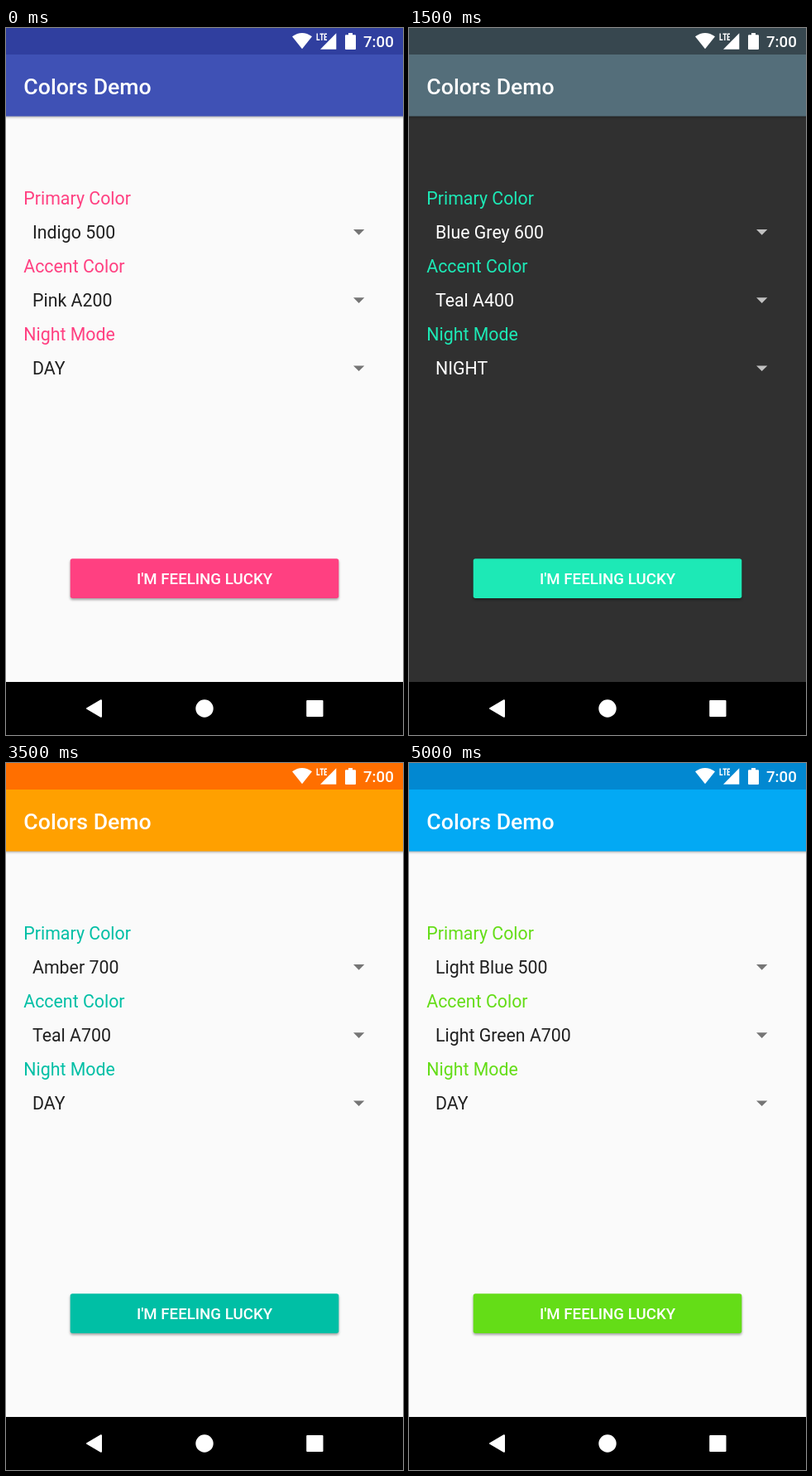
These frames come from a looping animation (480 px wide and 853 px high, 5500 ms). An HTML page:

```html
<!DOCTYPE html>
<html lang="en">
<head>
<meta charset="utf-8">
<title>Colors Demo</title>
<style>
  html, body { margin: 0; width: 100%; height: 100%; overflow: hidden; }
  svg { display: block; width: 100%; height: 100%; background: var(--page); }
  text { font: 21.33px Roboto, sans-serif; }
  .status { fill: var(--dark); }
  .bar { fill: var(--primary); filter: drop-shadow(0 1.5px 1.5px rgba(0, 0, 0, .35)); }
  .accent { fill: var(--accent); }
  .button { filter: drop-shadow(0 2px 1.5px rgba(0, 0, 0, .35)); }
  .value { fill: var(--ink); }
  .arrow { fill: var(--arrow); }
  .title { font-size: 26.67px; font-weight: 500; }
  .small { font-size: 18.67px; font-weight: 500; }
</style>
</head>
<body>
<svg viewBox="0 0 480 853">
  <rect class="bar" x="-10" y="20" width="500" height="86.5"/>
  <rect class="status" width="480" height="32"/>

  <g fill="#fff">
    <path d="M346 10.3Q358 1.700 370 10.300L358 25.300Z"/>
    <path d="M380 25.700H399.300V6.300Z"/>
    <path d="M376.200 6.500V14.300H379.400M379.500 7.200H384M381.800 7V15M388 7.200H385.300V14.300H388M385.300 10.700H387.700" fill="none" stroke="#fff" stroke-width="1.4"/>
    <path d="M414 6H419V8.200H422Q423 8.200 423 9.200V25Q423 26 422 26H411Q410 26 410 25V9.200Q410 8.200 411 8.200H414Z"/>
    <text class="small" x="432" y="23">7:00</text>
    <text class="title" x="21.3" y="79.5">Colors Demo</text>
  </g>

  <g class="accent">
    <text x="21.3" y="213">Primary Color</text>
    <text x="21.3" y="295">Accent Color</text>
    <text x="21.3" y="377.300">Night Mode</text>
    <rect class="button" x="77.700" y="640.300" width="324.600" height="47.700" rx="2.700"/>
  </g>
  <g class="value">
    <text x="32" y="254"></text>
    <text x="32" y="336"></text>
    <text x="32" y="418.300"></text>
  </g>
  <path class="arrow" d="M420 243h13.300l-6.650 6.700zM420 325.200h13.300l-6.650 6.700zM420 407.400h13.300l-6.650 6.700z"/>
  <text class="small" x="240" y="671.300" fill="#fff" text-anchor="middle">I'M FEELING LUCKY</text>

  <rect y="789" width="480" height="64"/>
  <g fill="#fff" stroke="#fff" stroke-width="2" stroke-linejoin="round">
    <path d="M98 821L115 811.200V830.800Z"/>
    <circle cx="240" cy="821" r="9.700"/>
    <rect x="364.200" y="812" width="18.300" height="18"/>
  </g>
</svg>
<script>
  const STEP = 500;

  // primary name, primary, status bar, accent name, accent, mode, dark page
  const themes = [
    ["Indigo 500", "#3f51b5", "#303f9f", "Pink A200", "#ff4081", "DAY"],
    ["Teal 600", "#00897b", "#00695c", "Orange A400", "#ff9100", "DAY"],
    ["Light Green 800", "#558b2f", "#33691e", "Amber A700", "#ffab00", "DAY"],
    ["Blue Grey 600", "#546e7a", "#37474f", "Teal A400", "#1de9b6", "NIGHT", true],
    ["Green 600", "#43a047", "#2e7d32", "Green A400", "#00e676", "NIGHT", true],
    ["Grey 900", "#212121", "#191919", "Red A400", "#ff1744", "DAY"],
    ["Brown 500", "#795548", "#5d4037", "Red A400", "#ff1744", "DAY"],
    ["Amber 700", "#ffa000", "#ff6f00", "Teal A700", "#00bfa5", "DAY"],
    ["Pink 800", "#ad1457", "#880e4f", "Red A400", "#ff1744", "AUTO", true],
    ["Purple 500", "#9c27b0", "#7b1fa2", "Pink A200", "#ff4081", "NIGHT", true],
    ["Light Blue 500", "#03a9f4", "#0288d1", "Light Green A700", "#64dd17", "DAY"]
  ];
  const values = document.querySelectorAll(".value text");
  const style = document.documentElement.style;
  let shown = -1;

  function show(theme) {
    const [primaryName, primary, dark, accentName, accent, mode, night] = theme;
    const colors = {
      primary, dark, accent,
      page: night ? "#303030" : "#fafafa",
      ink: night ? "#fff" : "#202020",
      arrow: night ? "#c1c1c1" : "#757575"
    };
    for (const name in colors) style.setProperty("--" + name, colors[name]);
    [primaryName, accentName, mode].forEach((text, i) => values[i].textContent = text);
  }

  function draw() {
    const index = Math.floor(performance.now() / STEP) % themes.length;
    if (index !== shown) show(themes[shown = index]);
    requestAnimationFrame(draw);
  }
  draw();
</script>
</body>
</html>
```
